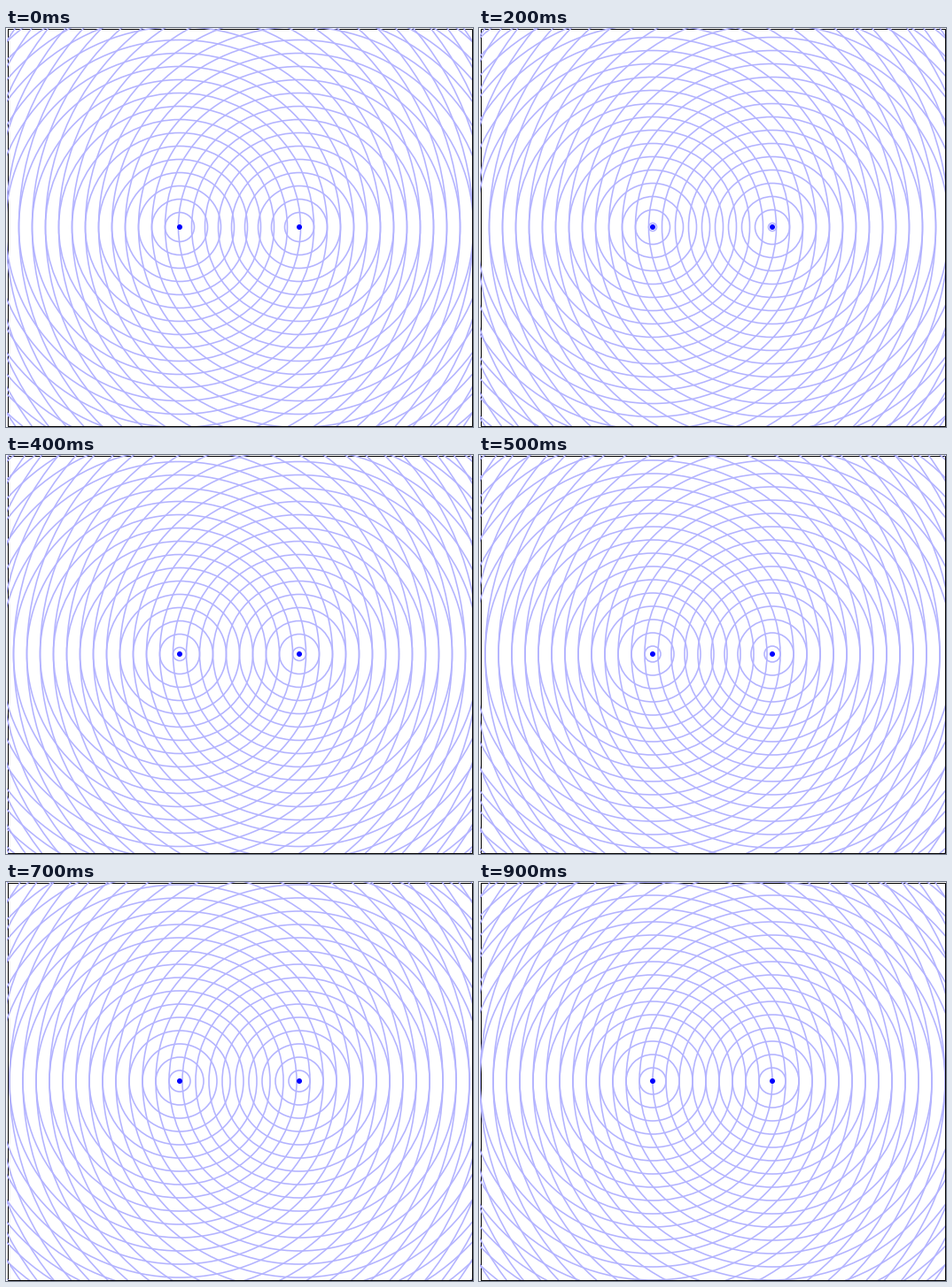
These frames come from a looping animation (527x451 px, 1 s). A matplotlib script:

```python
import numpy as np
import matplotlib.pyplot as plt
from matplotlib.animation import FuncAnimation
from matplotlib.collections import EllipseCollection
from matplotlib.patches import Circle, Rectangle

WIDTH, HEIGHT, DPI = 527, 451, 100
FRAMES, INTERVAL = 10, 100
SPACING = 15
RINGS = 28
SOURCES = [(196, 225), (331, 225)]
PX = 72 / DPI  # points per pixel

plt.rcParams["toolbar"] = "None"
fig = plt.figure(figsize=(WIDTH / DPI, HEIGHT / DPI), dpi=DPI, facecolor="white")
ax = fig.add_axes([0, 0, 1, 1])
ax.set_xlim(0, WIDTH)
ax.set_ylim(HEIGHT, 0)
ax.axis("off")

ax.add_patch(Rectangle((1.5, 0.5), 524, 449, fill=False, ec="black",
                       lw=PX, zorder=1))
stage = Rectangle((1, 0), 525, 450, transform=ax.transData)

circles = []
for source in SOURCES:
    for n in range(RINGS):
        ring = Circle(source, 1, fill=False, ec="#b3b3ff", lw=1.6 * PX, zorder=2)
        ax.add_patch(ring)
        ring.set_clip_path(stage)
        circles.append((ring, n * SPACING))
    ax.add_patch(Circle(source, 3, fc="blue", ec="none", zorder=3))


def update(frame):
    growth = SPACING * (frame + 1) / FRAMES
    for ring, base in circles:
        ring.set_radius(base + growth)
    return [ring for ring, _ in circles]


anim = FuncAnimation(fig, update, frames=FRAMES, interval=INTERVAL,
                     repeat=True, repeat_delay=0, blit=False)
plt.show()
```
